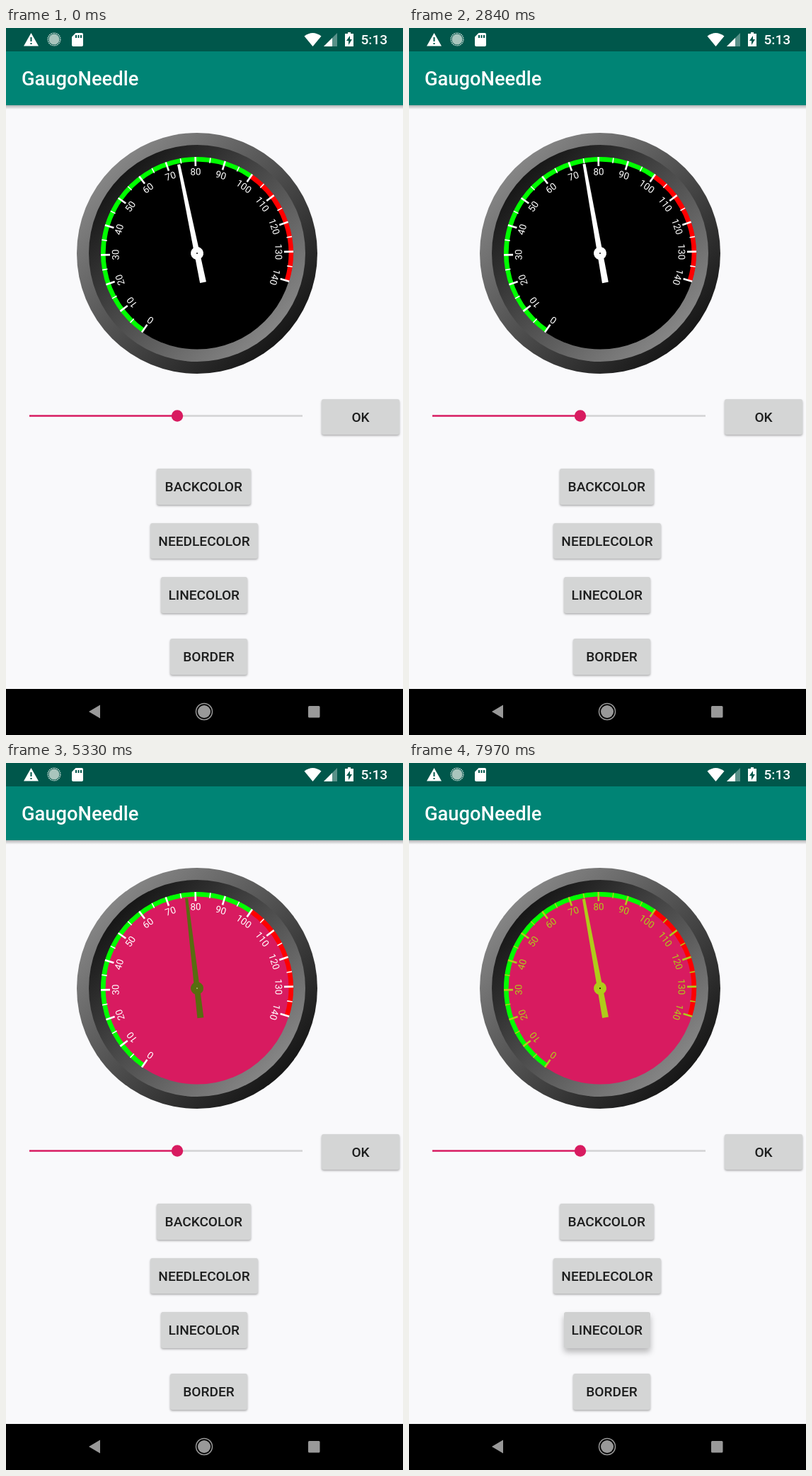
Animation, 561 px wide and 998 px high, one loop 8000 ms. Source, as an HTML page:

```html
<!DOCTYPE html>
<html lang="en">
<head>
<meta charset="utf-8">
<title>Gauge</title>
<style>
  html, body { margin: 0; width: 100%; height: 100%; overflow: hidden; background: #f9f9fb; }
  svg { position: absolute; left: 0; top: 0; }
  svg, .button { font-family: Roboto, sans-serif; }
  .button {
    position: absolute; height: 50.5px; border-radius: 3px;
    color: #1d1e1e; font-size: 19.1px; font-weight: 500;
    line-height: 51px; text-align: center; white-space: nowrap;
  }
</style>
</head>
<body>
<svg width="561" height="998" viewBox="0 0 561 998">
  <defs>
    <linearGradient id="outer" x2="1" y2="1">
      <stop stop-color="#9c9c9c"/><stop offset="1" stop-color="#000"/>
    </linearGradient>
    <linearGradient id="inner" x2="1" y2="1">
      <stop stop-color="#000"/><stop offset="1" stop-color="#9c9c9c"/>
    </linearGradient>
    <linearGradient id="shade" x2="0" y2="1">
      <stop stop-opacity=".28"/><stop offset="1" stop-opacity="0"/>
    </linearGradient>
  </defs>

  <rect width="561" height="998" fill="#f9f9fb"/>
  <rect y="109" width="561" height="6" fill="url(#shade)"/>
  <rect y="33" width="561" height="76" fill="#008475"/>
  <rect width="561" height="33" fill="#00574b"/>
  <text x="22" y="81" font-size="27.3" font-weight="500" fill="#fff">GaugoNeedle</text>

  <g fill="#fff">
    <path d="M35.5 7 46 25.5H25Z"/>
    <path d="M34.5 13h2v6h-2zM34.5 21h2v2h-2z" fill="#00574b"/>
    <circle cx="68" cy="16" r="7.5" fill="#a9c5bd"/>
    <circle cx="68" cy="16" r="8.8" fill="none" stroke="#c3d6d1" stroke-width="1.6" stroke-dasharray="1.6 1"/>
    <path d="M98.500 7H107q2 0 2 2V24q0 2-2 2H95q-2 0-2-2V12.500Z"/>
    <path d="M98 10h2v4h-2zM101.500 10h2v4h-2zM105 10h2v4h-2z" fill="#00574b"/>
    <path d="M421.500 11.500Q433.500 2.500 445.500 11.500L433.500 26Z"/>
    <path d="M468 7V26H449Z" opacity=".35"/>
    <path d="M461 14V26H449Z"/>
    <path d="M483 6h4v2h4V26H479V8h4z"/>
    <path d="M486 11v5h3l-5 8v-6h-3z" fill="#00574b"/>
    <text x="501.500" y="23" font-size="19.1" font-weight="500">5:13</text>
  </g>

  <circle cx="270" cy="318" r="170" fill="url(#outer)"/>
  <circle cx="270" cy="318" r="153" fill="url(#inner)"/>
  <g transform="translate(270 318)">
    <circle id="face" r="135.5"/>
    <g id="scale" font-size="13.5" text-anchor="middle"></g>
    <g id="needle">
      <path d="M-2-128H2L4.500 42H-4.500Z"/>
      <circle r="9"/>
      <circle id="pin" r="1"/>
    </g>
  </g>

  <path d="M242 547.500H419" stroke="#d3d3d4" stroke-width="2.700"/>
  <path d="M33 547.500H242" stroke="#d81b60" stroke-width="2.700"/>
  <circle cx="242" cy="547.500" r="8.200" fill="#d81b60"/>

  <rect y="933" width="561" height="65"/>
  <g fill="#999">
    <path d="M117 965 133 955.500V974.500Z"/>
    <circle cx="280" cy="965" r="9"/>
    <circle cx="280" cy="965" r="11.500" fill="none" stroke="#999" stroke-width="1.500"/>
    <rect x="427" y="957" width="16.500" height="16.500" rx="1.500"/>
  </g>
</svg>
<script>
  const LOOP = 8000;
  const OLIVE = '#586c10', LIME = '#afcc1a';
  const byId = id => document.getElementById(id);
  const clamp = x => Math.max(0, Math.min(1, x));

  const buttons = {};
  for (const [label, x, y, width] of [
    ['OK', 446, 523.5, 110], ['BACKCOLOR', 213, 622, 132.5], ['NEEDLECOLOR', 204, 698.5, 152],
    ['LINECOLOR', 218.5, 775, 122.5], ['BORDER', 232, 862, 109]
  ]) {
    const button = document.createElement('div');
    button.className = 'button';
    button.textContent = label;
    button.style.cssText = `left:${x}px;top:${y}px;width:${width}px`;
    document.body.append(button);
    buttons[label] = button;
  }

  // Dial angles are in degrees, clockwise from the top.
  const angleOf = speed => speed * 1.8 - 145;

  function arc(from, to, color) {
    const r = 132.7;
    const point = speed => {
      const a = angleOf(speed) * Math.PI / 180;
      return `${r * Math.sin(a)} ${-r * Math.cos(a)}`;
    };
    const large = (to - from) * 1.8 > 180 ? 1 : 0;
    return `<path d="M${point(from)}A${r} ${r} 0 ${large} 1 ${point(to)}" fill="none" stroke="${color}" stroke-width="6.600"/>`;
  }

  function buildScale() {
    let marks = arc(0, 100, '#0f0') + arc(100, 140, '#f00');
    for (let speed = 0; speed <= 140; speed += 5) {
      const major = speed % 10 === 0;
      marks += `<g transform="rotate(${angleOf(speed)})">
        <path d="M0-136V${major ? -123 : -128.5}" stroke="currentColor" stroke-width="${major ? 2.6 : 1.6}"/>
        ${major ? `<text y="-110.500" fill="currentColor">${speed}</text>` : ''}</g>`;
    }
    byId('scale').innerHTML = marks;
  }
  buildScale();

  // The needle trembles: each second it eases to a new angle.
  const TREMBLE_START = 570;
  const trembles = [-11.7, -9, -14.3, -5.4, -1.7, -7, -3.5, -7.5, -12];
  function needleAngle(t) {
    const progress = Math.max(0, t - TREMBLE_START) / 1000;
    const i = Math.floor(progress);
    const eased = 1 - (1 - progress + i) ** 2;
    return trembles[i] + (trembles[i + 1] - trembles[i]) * eased;
  }

  const taps = [
    { label: 'BACKCOLOR', down: 2230, up: 2430 },
    { label: 'BACKCOLOR', down: 3070, up: 3250 },
    { label: 'BACKCOLOR', down: 4030, up: 4200 },
    { label: 'NEEDLECOLOR', down: 4850, up: 5040 },
    { label: 'NEEDLECOLOR', down: 6060, up: 6250 },
    { label: 'LINECOLOR', down: 7800, up: 7960 }
  ];

  function drawButton(label, t) {
    let lift = 0, ripple = 0;
    for (const tap of taps) {
      if (tap.label !== label || t < tap.down) continue;
      const since = t - tap.up;
      lift = Math.max(lift, Math.min(clamp((t - tap.down) / 100), clamp(1 - since / 100)));
      if (since > 0) ripple = Math.max(ripple, Math.min(clamp(since / 60), clamp(1 - (since - 120) / 150)));
    }
    const gray = 212 - 24 * ripple;
    const style = buttons[label].style;
    style.background = `rgb(${gray},${gray + 1},${gray + 1})`;
    style.boxShadow = `0 ${1.5 + 4.5 * lift}px ${3 + 6 * lift}px rgba(0,0,0,${0.32 - 0.06 * lift})`;
  }

  function draw(t) {
    const needleColor = t < 5040 ? '#fff' : t < 6250 ? OLIVE : LIME;
    byId('face').setAttribute('fill', t < 3250 ? '#000' : t < 4200 ? '#00f' : '#d81b60');
    byId('scale').style.color = t < 7960 ? '#fff' : LIME;
    byId('needle').setAttribute('fill', needleColor);
    byId('needle').setAttribute('transform', `rotate(${needleAngle(t)})`);
    byId('pin').setAttribute('fill', needleColor === OLIVE ? '#b0b470' : '#000');
    for (const label in buttons) drawButton(label, t);
  }

  const start = performance.now();
  function tick() {
    draw((performance.now() - start) % LOOP);
    requestAnimationFrame(tick);
  }
  tick();
</script>
</body>
</html>
```
